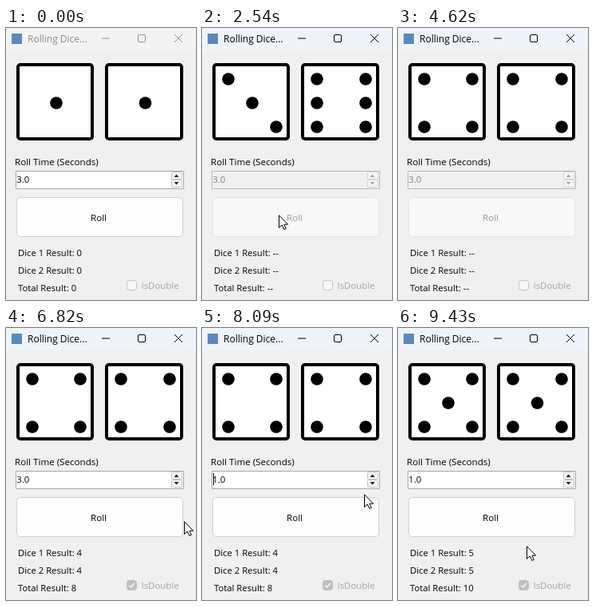
Animation, 238 px wide and 341 px high, one loop 9.9 s. Source, as an HTML page with a canvas:

```html
<!DOCTYPE html>
<html lang="en">
<head>
<meta charset="utf-8">
<title>Rolling Dice</title>
<style>
  html, body { margin: 0; width: 100%; height: 100%; overflow: hidden; background: #f0f0f0; }
  canvas { display: block; }
</style>
</head>
<body>
<canvas id="stage" width="238" height="341"></canvas>
<script>
const ctx = document.getElementById('stage').getContext('2d');
const LOOP = 9900, STEP = 66, ROLL_STEP = 266;
const FONT = '"Open Sans", "Noto Sans", sans-serif';

// Pointer moves: start time, number of steps, target x and y.
const START = [231, 371];
const MOVES = [
  [1060, 2, 183, 323], [1270, 7, 95, 216], [2070, 2, 96, 234], [2610, 4, 270, 255],
  [6820, 1, 223, 242], [6880, 9, 212, 193],
  [8090, 1, 203, 208], [8160, 2, 170, 232], [8360, 4, 161, 273]
];

// Faces shown one after another from each start time.
const ROLLS = [
  { start: 0, left: '1', right: '1' },
  { start: 2540, left: '361423', right: '624152' },
  { start: 4080, left: '654154', right: '614114' },
  { start: 8290, left: '2165', right: '3265' }
];

const clamp = v => Math.max(0, Math.min(1, v));
const within = (t, from, to) => t >= from && t < to;

function mix(a, b, p) {
  return `rgb(${a.map((v, i) => Math.round(v + (b[i] - v) * p))})`;
}

function text(str, x, y, color = '#000', size = 11.6, align = 'left') {
  ctx.font = `${size}px ${FONT}`;
  ctx.textAlign = align;
  ctx.fillStyle = color;
  ctx.fillText(str, x, y);
}

function box(x, y, w, h, r, fill, stroke, line = 1) {
  ctx.beginPath();
  ctx.roundRect(x, y, w, h, r);
  ctx.fillStyle = fill;
  ctx.fill();
  if (!stroke) return;
  ctx.strokeStyle = stroke;
  ctx.lineWidth = line;
  ctx.stroke();
}

function path(points, { fill, stroke, line = 1, close = false }) {
  ctx.beginPath();
  points.forEach(([x, y]) => ctx.lineTo(x, y));
  if (close) ctx.closePath();
  if (fill) { ctx.fillStyle = fill; ctx.fill(); }
  if (stroke) { ctx.strokeStyle = stroke; ctx.lineWidth = line; ctx.stroke(); }
}

function titleBar(active) {
  const ink = active ? '#000' : '#929292';
  ctx.fillStyle = active ? '#eef4f9' : '#f3f3f3';
  ctx.fillRect(0, 0, 238, 28);
  box(7, 7, 13, 13, 0, '#5a88c0');
  text('Rolling Dice...', 27, 18, active ? '#000' : '#8f8f8f', 12);
  path([[120, 13], [130, 13]], { stroke: ink });
  ctx.beginPath();
  ctx.roundRect(165.5, 8.5, 9, 9, 1.5);
  ctx.stroke();
  path([[211, 8], [221, 18]], { stroke: ink });
  path([[221, 8], [211, 18]], { stroke: ink });
}

function die(x, width, centre, gap, face) {
  box(x + 2, 46, width - 4, 93, 3, '#fff', '#000', 4);
  const pip = (col, row) => {
    ctx.beginPath();
    ctx.arc(centre + col * gap, 94 + row * 30, 7.8, 0, Math.PI * 2);
    ctx.fillStyle = '#000';
    ctx.fill();
  };
  const pair = (col, row) => { pip(col, row); pip(-col, -row); };
  if (face % 2) pip(0, 0);
  if (face > 1) pair(-1, -1);
  if (face > 3) pair(1, -1);
  if (face === 6) pair(-1, 0);
}

function numberBox(value, enabled, hot, caret) {
  box(12.5, 179.5, 210, 22, 0, enabled ? '#fff' : '#f0f0f0', enabled ? '#a5a7ab' : '#b8b8b8');
  text(value, 13.3, 194, enabled ? '#000' : '#838383', 11.4);
  if (caret) { ctx.fillStyle = '#000'; ctx.fillRect(14, 182, 1, 15); }
  const arrow = enabled ? '#222' : '#a8a8a8';
  const edge = enabled ? '#c4c4c4' : '#d4d4d4';
  box(207.5, 180.5, 13, 9, 1, '#f5f5f5', edge);
  box(207.5, 190.5, 13, 9, 1, hot ? '#e0eef9' : '#f5f5f5', hot ? '#0078d4' : edge);
  path([[210.5, 187], [213.5, 183.5], [216.5, 187]], { fill: arrow });
  path([[210.5, 193], [213.5, 196.5], [216.5, 193]], { fill: arrow });
}

function rollButton(enabled, hover, pressed) {
  let fill = mix([253, 253, 253], [224, 238, 249], hover);
  let edge = mix([208, 208, 208], [0, 120, 212], hover);
  if (pressed) [fill, edge] = ['#cce4f7', '#005499'];
  if (!enabled) [fill, edge] = ['#f8f8f8', '#e4e4e4'];
  box(13.5, 212.5, 208, 49, 4, fill, edge);
  text('Roll', 116, 242, enabled ? '#000' : '#9d9d9d', 11.6, 'center');
}

function checkBox(checked) {
  box(151.5, 316.5, 12, 12, 3, checked ? '#bfbfbf' : '#f8f8f8', checked ? '#bfbfbf' : '#c3c3c3');
  if (checked) path([[154.5, 322.5], [156.7, 325], [160.8, 320]], { stroke: '#fff', line: 1.2 });
  text('IsDouble', 169.5, 327, '#a0a5a0', 11.4);
}

function pointer(t) {
  let [x, y] = START;
  for (const [start, steps, toX, toY] of MOVES) {
    if (t < start) break;
    const p = clamp((Math.floor((t - start) / STEP) + 1) / steps);
    const eased = 1 - (1 - p) ** 2;
    x += (toX - x) * eased;
    y += (toY - y) * eased;
  }
  x = Math.round(x);
  y = Math.round(y);
  const shape = [[.5, .8], [.5, 16.5], [4.2, 13], [6.8, 18.5], [9.2, 17.5], [6.9, 12.2], [11.6, 12.2]];
  path(shape.map(([px, py]) => [px + x, py + y]), { fill: '#fff', stroke: '#000', close: true });
}

function draw(t) {
  const rolling = within(t, 2480, 5760) || within(t, 8290, 9430);
  const roll = ROLLS.findLast(r => t >= r.start);
  const index = Math.min(roll.left.length - 1, Math.floor((t - roll.start) / ROLL_STEP));
  const total = t < 2480 ? 0 : t < 8290 ? 8 : 10;
  const shown = value => rolling ? '--' : value;
  const hover = within(t, 1400, 2480) ? clamp((t - 1400) / 220)
    : within(t, 8160, 8290) ? clamp((t - 8130) / 220) : 0;
  const seconds = t < 7620 ? 3 : t < 7820 ? 2 : 1;

  ctx.fillStyle = '#f0f0f0';
  ctx.fillRect(0, 0, 238, 341);
  titleBar(t >= 2410);
  die(13, 97, 63, 30, +roll.left[index]);
  die(124, 98, 174.5, 30.5, +roll.right[index]);
  text('Roll Time (Seconds)', 11, 172);
  numberBox(seconds + '.0', !rolling, within(t, 7350, 8090), within(t, 7620, 8220));
  rollButton(!rolling, hover, within(t, 2410, 2480) || within(t, 8220, 8290));
  text('Dice 1 Result: ' + shown(total / 2), 15, 286, '#000', 11.3);
  text('Dice 2 Result: ' + shown(total / 2), 15, 308, '#000', 11.3);
  text('Total Result: ' + shown(total), 15, 330, '#000', 11.3);
  checkBox(total > 0 && !rolling);
  pointer(t);
}

const begin = performance.now();
function tick() {
  draw((performance.now() - begin) % LOOP);
  requestAnimationFrame(tick);
}
tick();
</script>
</body>
</html>
```
